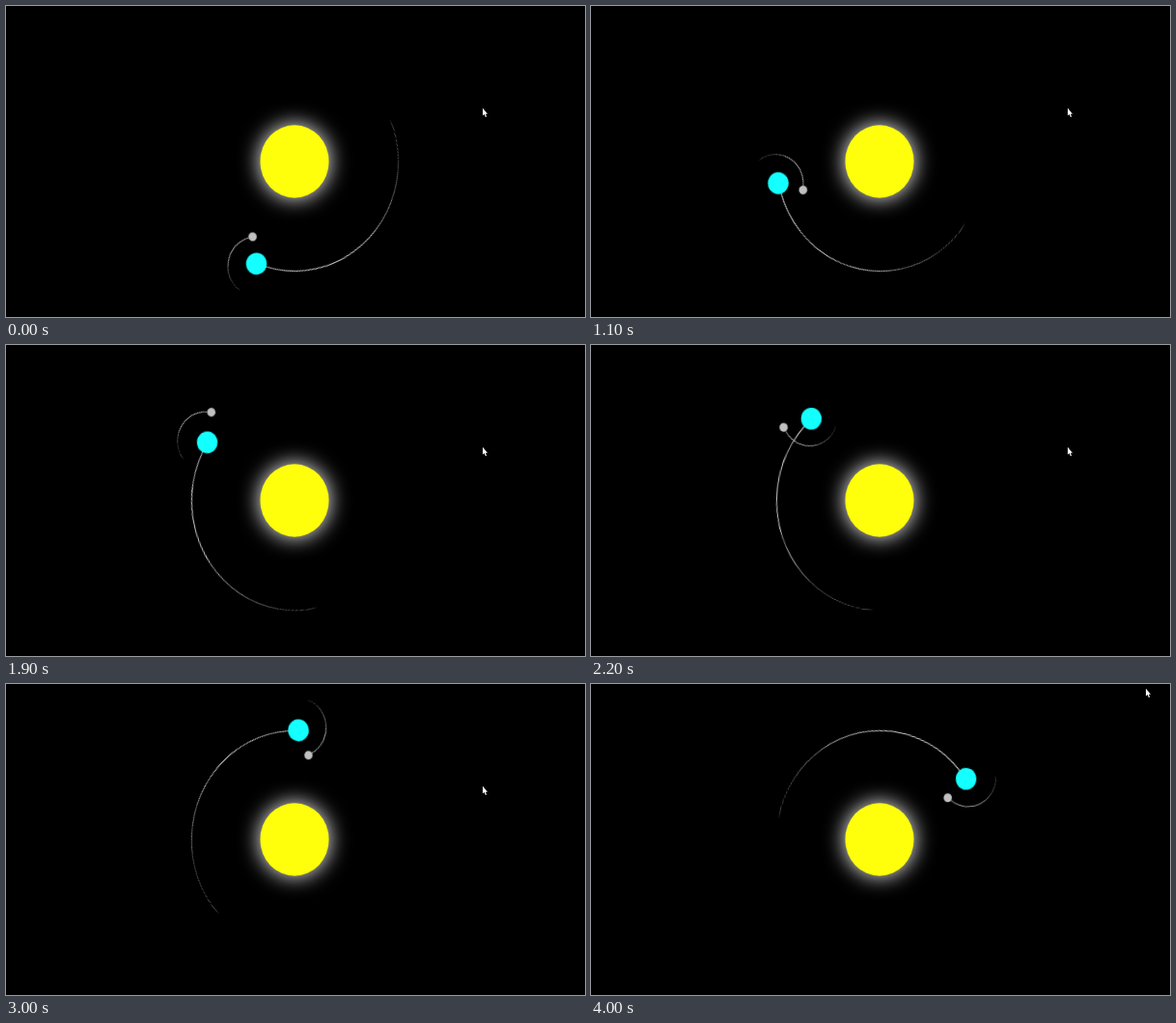
An HTML page that plays this animation: 600x322 px, repeating every 4100 ms.

```html
<!DOCTYPE html>
<html lang="en">
<head>
<meta charset="utf-8">
<title>Orbits</title>
<style>
  html, body {
    margin: 0;
    width: 100%;
    height: 100%;
    overflow: hidden;
    background: #000;
  }

  /* Drawn large, then scaled down so the trails stay thinner than a pixel */
  .system {
    position: absolute;
    left: 299.1px;
    top: 161.2px;
    font-size: 20px;
    transform-origin: 0 0;
    transform: scale(.3565, .377);
  }

  .sun, .earth, .moon, .earth::before, .moon::before {
    position: absolute;
    border-radius: 50%;
  }

  .sun {
    left: -5em;
    top: -5em;
    width: 10em;
    height: 10em;
    background: #ffff0c;
    box-shadow: 0 0 3em #fff;
  }

  /* Each trail is a top border that tapers away to the left */
  .earth, .moon {
    border-style: solid;
    border-width: .1em .1em 0 0;
    border-color: #fff transparent transparent;
    animation: 4.1s infinite;
  }

  .earth {
    left: -15em;
    top: -15em;
    width: 30em;
    height: 30em;
    animation-name: orbit;
    --start: 156.8deg;
    --from: 159.5deg;
    --to: 376.7deg;
  }

  .moon {
    top: 0;
    right: 0;
    width: 8em;
    height: 8em;
    border-top-color: silver;
    animation-name: orbit;
    --start: -213.75deg;
    --from: -175.75deg;
    --to: 2757.85deg;
  }

  .earth::before, .moon::before { content: ""; }

  .earth::before {
    top: 2.8em;
    right: 2.8em;
    width: 3em;
    height: 3em;
    background: #14ffff;
  }

  .moon::before {
    top: .8em;
    right: .2em;
    width: 1.2em;
    height: 1.2em;
    background: silver;
  }

  .pointer {
    position: absolute;
    left: 493px;
    top: 105px;
    width: 8px;
    height: 12px;
    animation: leave 4.1s infinite;
  }

  /* A short first step, then an even turn every 100 ms */
  @keyframes orbit {
    0% { transform: rotate(var(--start)); animation-timing-function: step-end; }
    2.43% { transform: rotate(var(--from)); animation-timing-function: steps(40, end); }
    100% { transform: rotate(var(--to)); }
  }

  @keyframes leave {
    0%, 87.75% { transform: none; animation-timing-function: steps(4, end); }
    97.5%, 100% { transform: translate(81px, -101px); }
  }
</style>
</head>
<body>
  <div class="system">
    <div class="sun"></div>
    <div class="earth"><div class="moon"></div></div>
  </div>
  <svg class="pointer" viewBox="0 0 8 12">
    <path d="M1 .8V8.6L2.7 7.1L3.9 10L5.1 9.5L3.9 6.7H6Z" fill="#fff"/>
  </svg>
</body>
</html>
```
